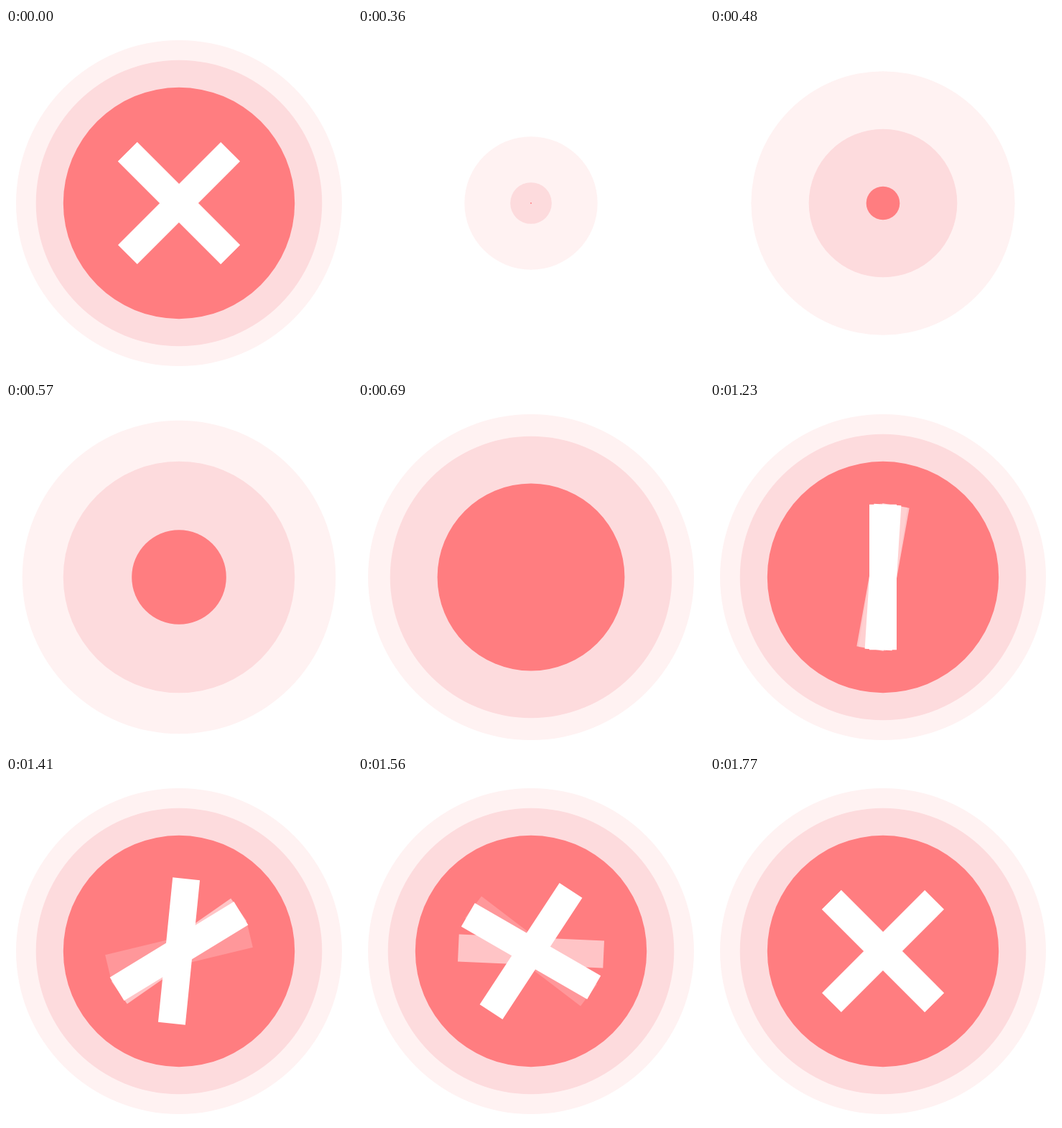
Write an HTML page that moves like this. It is 482x482 px and loops after 2250 ms.

```html
<!DOCTYPE html>
<html lang="en">
<head>
<meta charset="utf-8">
<title>Error badge</title>
<style>
  html, body { margin: 0; width: 100%; height: 100%; overflow: hidden; background: #fff; }
  svg { display: block; width: 100%; height: 100%; }
</style>
</head>
<body>
<svg viewBox="0 0 482 482">
  <g transform="translate(241 244)">
    <circle id="halo" fill="#fff2f2"/>
    <circle id="ring" fill="#fddbdd"/>
    <circle id="disc" fill="#ff7d80"/>
    <g id="bars" fill="#fff"></g>
  </g>
</svg>
<script>
const LOOP = 2250, STEP = 30, INTRO = 120, END = 1770;
const BAR_WIDTH = 38, BAR_LENGTH = 202.5;
const byId = id => document.getElementById(id);
const clamp = v => Math.min(1, Math.max(0, v));
const linear = x => x;

// cubic-bezier(.5, 0, .5, 1), solved by bisection
function ease(x) {
  if (x <= 0 || x >= 1) return clamp(x);
  let low = 0, high = 1;
  for (let i = 0; i < 24; i++) {
    const s = (low + high) / 2;
    if (1.5 * s * (1 - s) + s ** 3 < x) low = s; else high = s;
  }
  return low * low * (3 - 2 * low);
}

const progress = (t, start, duration, curve = ease) => curve(clamp((t - start) / duration));

const circles = [
  { node: byId('halo'), radius: 227, start: 115 },
  { node: byId('ring'), radius: 199.3, start: 205 },
  { node: byId('disc'), radius: 161.2, start: 325 }
];

// Two solid bars and two translucent trails
const bars = [
  { angle: 135, start: 1122, duration: 540, opacity: 0.2 },
  { angle: 135, start: 1189, duration: 541, opacity: 0.55, curve: linear },
  { angle: 135, start: 1158, duration: 540, opacity: 1 },
  { angle: 45, start: 1296, duration: 420, opacity: 1 }
];

for (const bar of bars) {
  bar.node = document.createElementNS('http://www.w3.org/2000/svg', 'rect');
  bar.node.setAttribute('fill-opacity', bar.opacity);
  byId('bars').append(bar.node);
}

function setAttributes(node, values) {
  for (const name in values) node.setAttribute(name, values[name]);
}

function draw(time) {
  const t = time < INTRO || time >= END ? LOOP : Math.floor(time / STEP) * STEP;
  for (const { node, radius, start } of circles) {
    node.setAttribute('r', radius * progress(t, start, 540));
  }
  const growth = progress(t, 915, 235);
  const width = BAR_WIDTH * growth ** 1.08;
  const height = BAR_LENGTH * growth;
  for (const { node, angle, start, duration, curve } of bars) {
    setAttributes(node, {
      x: -width / 2, y: -height / 2, width, height,
      transform: `rotate(${angle * progress(t, start, duration, curve)})`
    });
  }
}

const origin = performance.now();
function tick() {
  draw((performance.now() - origin) % LOOP);
  requestAnimationFrame(tick);
}
tick();
</script>
</body>
</html>
```
